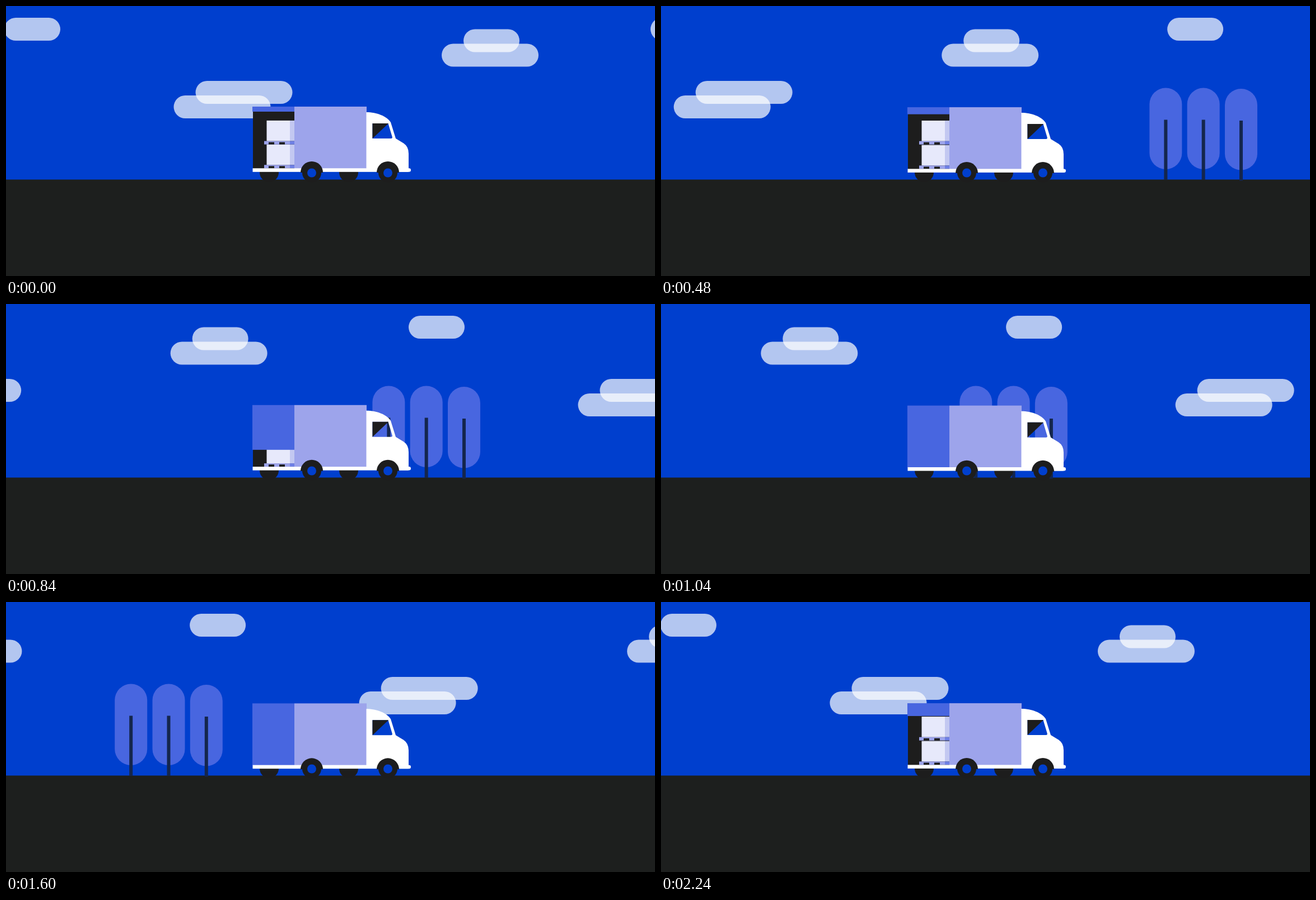
An HTML page with a canvas that plays this animation: 1159 px wide and 483 px high, repeating every 2.28 s.

```html
<!DOCTYPE html>
<html lang="en">
<head>
<meta charset="utf-8">
<title>Delivery truck</title>
<style>
  html, body { margin: 0; width: 100%; height: 100%; overflow: hidden; background: #003fce; }
  canvas { display: block; width: 1159px; height: 483px; }
</style>
</head>
<body>
<canvas id="stage" width="1159" height="483"></canvas>
<script>
const ctx = document.getElementById('stage').getContext('2d');
const W = 1159, H = 483, LOOP = 2280, STEP = 40, GROUND_Y = 310.5;

const SKY = '#003fce', GROUND = '#1d1f1e', DARK = '#1d1d1d', WHITE = '#ffffff';
const INDIGO = '#4866e0', LILAC = '#9da4eb', TRUNK = '#14264d';
const CLOUD = 'rgba(255,255,255,0.7)';

// x, y, width of each cloud pill
const PILLS = [
  [-3, 21, 100],
  [778, 67.5, 173], [817, 41.5, 100],
  [299.5, 160, 173], [338.5, 134, 173]
];

const clamp = v => Math.max(0, Math.min(1, v));
const ramp = (t, from, to) => clamp((t - from) / (to - from));

function rect(x, y, w, h, color) {
  ctx.fillStyle = color;
  ctx.fillRect(x, y, w, h);
}

function pill(x, y, w, h, color) {
  ctx.fillStyle = color;
  ctx.beginPath();
  ctx.roundRect(x, y, w, h, Math.min(w, h) / 2);
  ctx.fill();
}

function disc(x, y, r, color, start = 0) {
  ctx.fillStyle = color;
  ctx.beginPath();
  ctx.arc(x, y, r, start, Math.PI * 2);
  ctx.fill();
}

function clouds(shift) {
  for (const [x, y, w] of PILLS) pill(x + shift, y, w, 41, CLOUD);
}

function trees(x) {
  for (let i = 0; i < 3; i++) {
    const left = x + i * 67.3, drop = i === 2 ? 1.5 : 0;
    pill(left, 146.5 + drop, 58, 145.5, INDIGO);
    rect(left + 26, 203.5 + drop, 6, 107.5, TRUNK);
  }
}

function crate(y) {
  rect(465.5, y, 41.5, 36.7, '#e7e9fb');
  rect(507, y, 8, 36.7, '#c3c8f1');
  const base = y + 36.7;
  rect(461, base, 46, 6, LILAC);
  rect(507, base, 8, 6, '#6f80e5');
  rect(469, base + 2, 10, 4, DARK);
  rect(488, base + 2, 10, 4, DARK);
}

function cab() {
  ctx.fillStyle = WHITE;
  ctx.beginPath();
  ctx.moveTo(643.5, 190);
  ctx.bezierCurveTo(662, 190, 680, 197, 687, 208);
  ctx.lineTo(696, 237);
  ctx.lineTo(710, 245.5);
  ctx.quadraticCurveTo(719, 251.5, 719, 264);
  ctx.lineTo(719, 291);
  ctx.lineTo(643.5, 291);
  ctx.closePath();
  // see-through window
  ctx.moveTo(654.5, 210);
  ctx.lineTo(682.5, 210);
  ctx.lineTo(689.7, 234);
  ctx.quadraticCurveTo(690.5, 237, 687.5, 237);
  ctx.lineTo(654.5, 237);
  ctx.closePath();
  ctx.fill('evenodd');

  ctx.fillStyle = DARK;
  ctx.beginPath();
  ctx.moveTo(654.5, 210);
  ctx.lineTo(683, 210);
  ctx.lineTo(654.5, 237);
  ctx.fill();
}

function truck(t) {
  const swing = (1 - Math.cos(t / 680 * Math.PI * 2)) / 2;
  const hop = 5.7 * swing ** 4;
  const door = 9 + 102 * (ramp(t, 461, 1005) - ramp(t, 1770, 2314));

  for (const x of [470, 612]) disc(x, 298, 17, DARK);

  ctx.save();
  ctx.translate(0, 1.7 * swing);
  rect(441, 181, 74, 110, DARK);
  crate(247.6);
  crate(204.9 - hop);
  rect(440, 180, 75, door, INDIGO);
  rect(515, 180, 129, 111, LILAC);
  cab();
  rect(440.5, 290.3, 278, 6.5, WHITE);
  pill(700, 290.3, 23, 6.5, WHITE);
  for (const x of [546, 682]) disc(x, 298, 20, DARK, Math.PI);
  ctx.restore();

  for (const x of [546, 682]) {
    disc(x, 298.5, 17, DARK);
    disc(x, 298.5, 8, SKY);
  }
}

function draw(t) {
  rect(0, 0, W, H, SKY);
  clouds(-0.5766 * t);
  clouds(1154 - 0.5143 * t);
  rect(0, GROUND_Y, W, H - GROUND_Y, GROUND);
  trees(1163 - 0.6055 * t);
  truck(t);
}

function tick() {
  const t = performance.now() % LOOP;
  draw(Math.floor(t / STEP) * STEP);
  requestAnimationFrame(tick);
}
tick();
</script>
</body>
</html>
```
